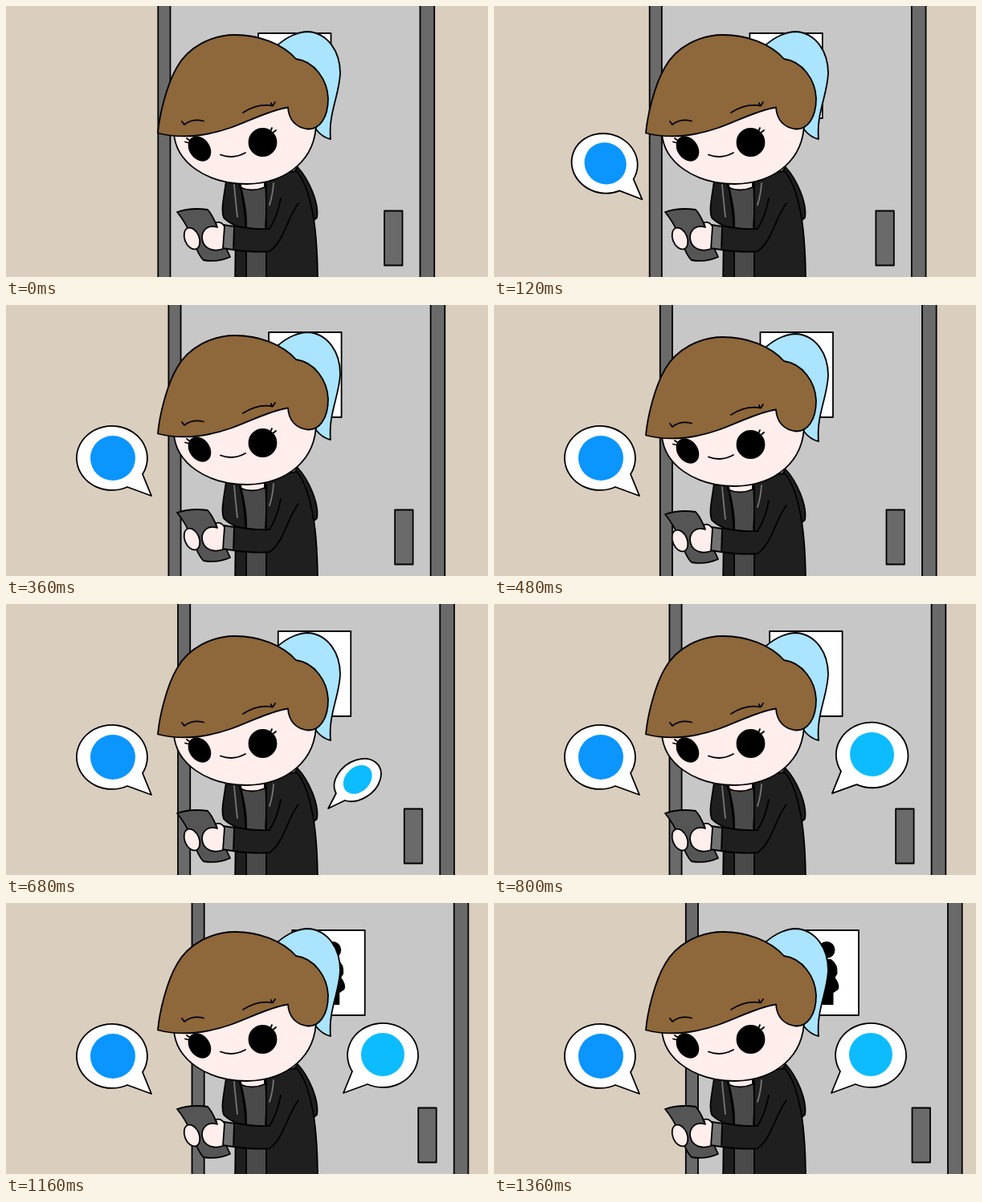
Write an HTML page that moves like this. It is 600x338 px and loops after 1.4 s.

```html
<!DOCTYPE html>
<html lang="en">
<head>
<meta charset="utf-8">
<title>Phone walk</title>
<style>
  html, body { margin: 0; height: 100%; overflow: hidden; background: #dacebf; }
  svg { display: block; width: 100vw; height: 100vh; }
  .ink { stroke: #000; stroke-width: 1.8; stroke-linejoin: round; stroke-linecap: round; }
  .line { fill: none; }
  .metal { fill: #6a6a6a; }
  .skin { fill: #ffeeec; }
  .coat { fill: #1f1f1f; }
  .trim { fill: none; stroke: #777; stroke-width: 1.8; stroke-linecap: round; }
  .bubble path { fill: #fff; vector-effect: non-scaling-stroke; }
</style>
</head>
<body>
<svg viewBox="0 0 600 338">
  <rect width="600" height="338" fill="#dacebf"/>

  <g id="door" class="ink">
    <rect x="189.3" y="-5" width="343.9" height="350" class="metal"/>
    <rect x="204.5" y="-5" width="311" height="350" fill="#c7c7c7"/>
    <rect x="471" y="255.500" width="22.500" height="68" class="metal"/>
    <rect x="314" y="34" width="90.500" height="106" fill="#fff"/>
    <g stroke="none">
      <circle cx="364.500" cy="58.500" r="10.500"/>
      <path d="M352 70H370Q379 76 378 88L375 93Q382 102 379 108L373 112V127H353Z"/>
    </g>
  </g>

  <g id="person" class="ink">
    <path class="coat" d="M355 211L363 201C377 216 390 246 387 264L380 270Z"/>
    <path class="coat" d="M274 218C272 235 267 254 271 264Q277 270 286 274L285 350H388C388 312 386 275 380 250Q374 221 362 206Z"/>
    <path fill="#4a4a4a" d="M291 222C296 243 300 260 299 350H324V222Z"/>
    <path class="skin" d="M291 215V226Q306 233 322 226V215Z"/>
    <path class="line" d="M292 223C296 242 300 258 299 276M323 222Q325 250 323 276"/>
    <path class="trim" d="M284 223Q286 245 288 263M333 221Q332 236 328 248"/>
    <path class="coat" d="M342 240Q338 262 328 278Q306 279 284 274L283 304Q312 308 328 306C346 294 350 264 364 246"/>
    <path fill="#555" d="M213 257Q230 251 251 254Q259 263 264 280L279 313Q264 320 246 317Q240 312 232 290Q224 270 213 257Z"/>
    <path fill="#737373" d="M271 273L284 275L283 304L269 302Z"/>
    <path class="skin" d="M272 275Q268 268 261 270L263 276C251 272 244 280 244 289C245 303 258 307 270 303Z"/>
    <ellipse class="skin" cx="231.500" cy="290" rx="9" ry="14" transform="rotate(-22 231.500 290)"/>

    <path fill="#abe4ff" d="M338 49C351 37 366 32 376 32C401 34 416 57 416 84C415 111 401 134 404 166Q394 164 386 154L360 100Z"/>
    <path class="skin" d="M209 158C211 195 250 222 300 222C349 221 388 192 386 140L300 90Z"/>
    <path fill="#8e673b" d="M189 158.500C191 136 200 98 213 76C227 51 256 36 285 36C315 36 344 47 361 66C384 69 400 92 401 115C401 140 390 154 376 153.500C361 152 352 142 351 126.500C328 130 304 143 279 152C250 162 219 166 189 158.500Z"/>
    <path class="line" d="M222 148Q232 140 246 143.500M219 144L222 148M295 133Q314 121 332 124.500L335 120M331 124L330 121"/>
    <ellipse cx="241" cy="178" rx="11.800" ry="16" transform="rotate(-36 241 178)"/>
    <ellipse cx="319.500" cy="170" rx="17" ry="17"/>
    <path class="line" d="M229 168L225 165M229 171L223 169.500M327 157Q330 156 331 152M330 159Q333 158 336 155M267 185.500Q283 191.500 298 183"/>
  </g>

  <g class="bubble">
    <path class="ink" d="M170 211L181 238L151 227A44 40 0 1 1 170 211Z"/>
    <circle cx="133" cy="191" r="28" fill="#0a95ff"/>
  </g>
  <g class="bubble">
    <path class="ink" d="M431 210L420 237L450 226A44 40 0 1 0 431 210Z"/>
    <circle cx="469" cy="189" r="27" fill="#0dbcff"/>
  </g>
</svg>
<script>
const LOOP = 1400, STEP = 40;
const door = document.getElementById('door');
const person = document.getElementById('person');
const [chat, post] = document.querySelectorAll('.bubble');

const ease = (t, from, to) => {
  const p = Math.min(1, Math.max(0, (t - from) / (to - from)));
  return p * p * (3 - 2 * p);
};

// Grow quickly, overshoot a little, then settle.
const pop = age => age < 160
  ? 1.025 * Math.sin(Math.max(0, age) / 160 * Math.PI / 2) ** 0.9
  : 1.025 - 0.025 * ease(age, 160, 240);

// Bubbles fly out along a diagonal and are stretched along it while small.
function place(bubble, x, y, angle, size) {
  bubble.setAttribute('visibility', size > 0 ? 'visible' : 'hidden');
  bubble.setAttribute('transform', `translate(${x} ${y}) rotate(${angle}) ` +
    `scale(${size} ${size * size}) rotate(${-angle}) translate(${-x} ${-y})`);
}

function draw(now) {
  const t = Math.floor(now % LOOP / STEP) * STEP;
  const bob = 4 * (ease(t, 260, 460) - ease(t, 970, 1150));
  door.setAttribute('transform', `translate(${t * 0.0364} 0)`);
  person.setAttribute('transform', `translate(0 ${bob})`);
  place(chat, 256, 311, 45, pop(t));
  place(post, 345, 310, -45, pop(t - 600));
  requestAnimationFrame(draw);
}
draw(0);
</script>
</body>
</html>
```
